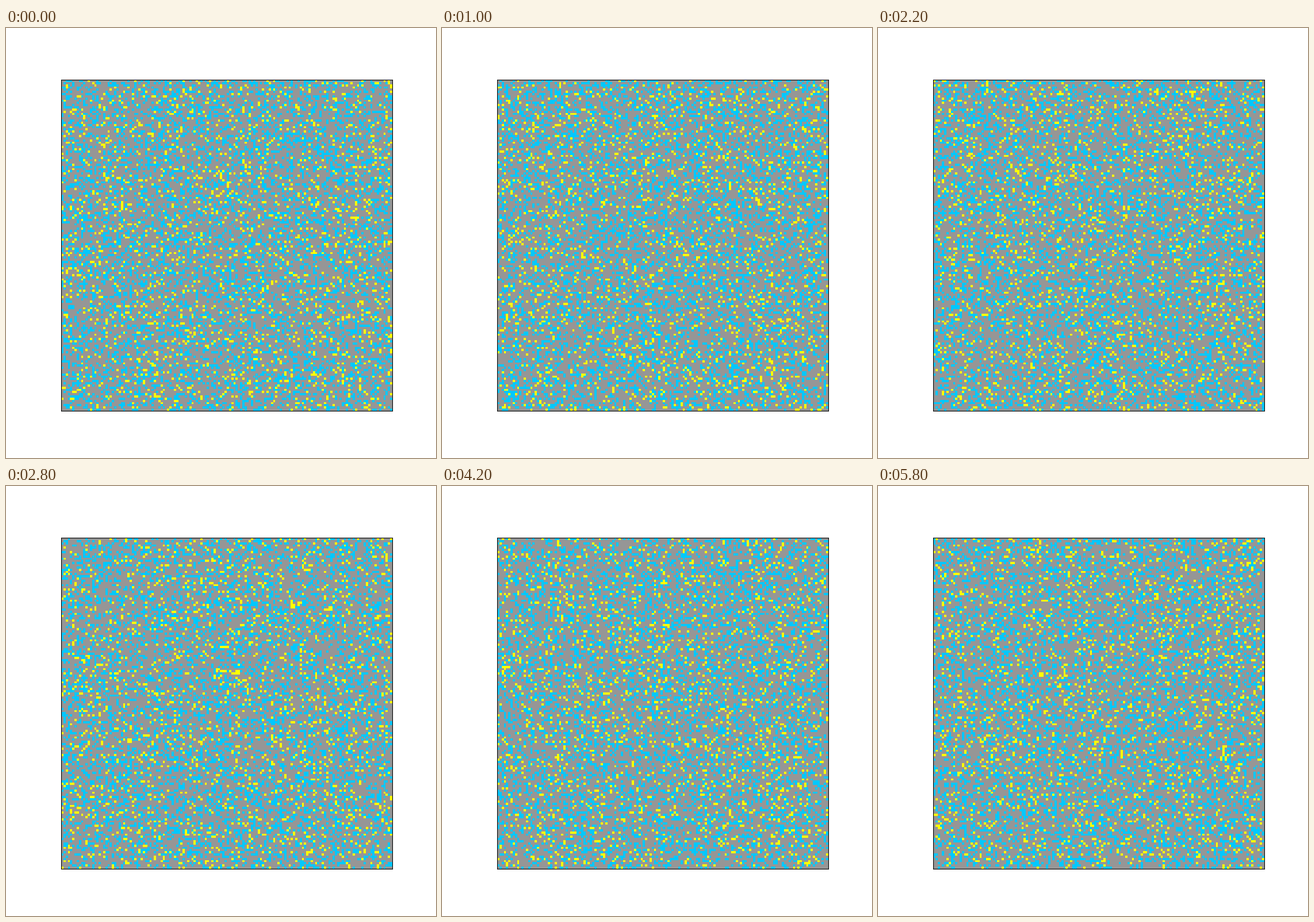
Write a matplotlib script that moves like this. It is 748 by 748 pixels and loops after 6000 ms.

```python
import numpy as np
import matplotlib.pyplot as plt
from matplotlib.animation import FuncAnimation
from matplotlib.colors import ListedColormap

SIZE, DPI = 748, 100
GRID = 150
BLUE, YELLOW = 6300, 1800
STEP_MS, FRAMES = 200, 30
COLORS = ListedColormap(["#969696", "#00c8ff", "#ffff00"])


def scatter(step):
    """Deal a fixed number of blue and yellow cells over the grid."""
    cells = np.zeros(GRID * GRID, dtype=int)
    cells[:BLUE] = 1
    cells[BLUE:BLUE + YELLOW] = 2
    np.random.default_rng(100 + step).shuffle(cells)
    return cells.reshape(GRID, GRID)


fig = plt.figure(figsize=(SIZE / DPI, SIZE / DPI), dpi=DPI, facecolor="white")
ax = fig.add_axes([96 / SIZE, 82 / SIZE, 576 / SIZE, 576 / SIZE])
ax.set(xticks=[], yticks=[])
image = ax.imshow(scatter(0), cmap=COLORS, vmin=0, vmax=2,
                  interpolation="nearest", aspect="auto")


def draw(i):
    # The opening state is held for two ticks.
    image.set_data(scatter(max(0, i - 1)))
    return [image]


anim = FuncAnimation(fig, draw, frames=FRAMES, interval=STEP_MS,
                     repeat=True, repeat_delay=0)
plt.show()
```
